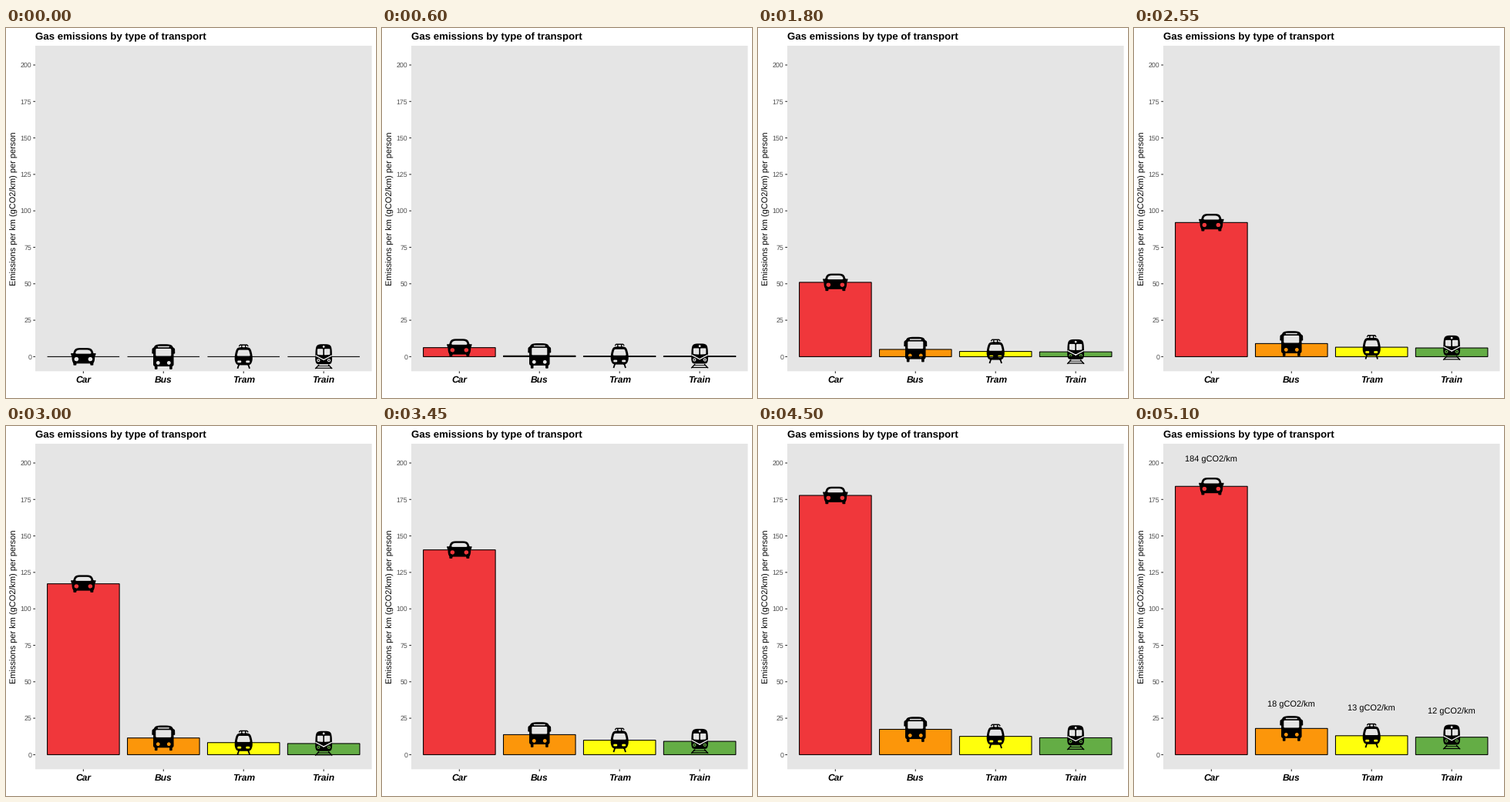
A matplotlib script that plays this animation: 480 by 480 pixels, repeating every 8000 ms.

```python
import numpy as np
import matplotlib.pyplot as plt
from matplotlib.animation import FuncAnimation
from matplotlib.patches import PathPatch, Rectangle
from matplotlib.path import Path
from matplotlib.transforms import Affine2D

plt.rcParams["font.family"] = "Liberation Sans"
plt.rcParams["text.hinting"] = "none"

SIZE = 480
TICK_MS, LOOP_MS = 50, 8000
STEP_MS, STEPS = 150, 34
LEFT, RIGHT, TOP, BOTTOM = 38, 474.5, 23, 445.3
ZERO, UNIT = 426.4, 1.892        # pixel row of 0, pixels per gram
PITCH = (RIGHT - LEFT) / 4.2
LINE = 1.07


# --- shapes: point arrays in pixels, y pointing down ---

def poly(points, r=0.0):
    """Polygon whose corners are rounded by about r pixels."""
    pts = np.array(points, float)
    if r == 0:
        return pts
    out = []
    t = np.linspace(0, 1, 7)[:, None]
    for i, p in enumerate(pts):
        ends = []
        for q in (pts[i - 1], pts[(i + 1) % len(pts)]):
            d = np.hypot(*(q - p))
            ends.append(p + (q - p) * min(r, d / 2) / d)
        a, b = ends
        out.append((1 - t) ** 2 * a + 2 * t * (1 - t) * p + t ** 2 * b)
    return np.vstack(out)


def box(x0, y0, x1, y1, r=0.0):
    return poly([(x0, y0), (x1, y0), (x1, y1), (x0, y1)], r)


def disc(x, y, r):
    a = np.linspace(0, 2 * np.pi, 25)[:-1]
    return np.column_stack([x + r * np.cos(a), y + r * np.sin(a)])


def bar(x0, y0, x1, y1, w):
    """Straight stroke of width w."""
    a, b = np.array([x0, y0]), np.array([x1, y1])
    d = (b - a) / np.hypot(*(b - a))
    n = np.array([-d[1], d[0]]) * w / 2
    return np.array([a + n, b + n, b - n, a - n])


def pair(shape):
    return [shape, shape * [-1, 1]]


def sym(half, r):
    """Closed outline from its right half, listed top to bottom."""
    return poly(half + [(-x, y) for x, y in half[::-1]], r)


def compound(solids, holes=()):
    """One path; holes wind against the solids."""
    verts, codes = [], []
    for group, sign in ((solids, 1), (holes, -1)):
        for s in group:
            x, y = s.T
            area = np.sum(x * np.roll(y, -1) - y * np.roll(x, -1))
            s = s if area * sign > 0 else s[::-1]
            verts.append(np.vstack([s, s[:1]]))
            codes += [Path.MOVETO] + [Path.LINETO] * (len(s) - 1) + [Path.CLOSEPOLY]
    return Path(np.vstack(verts), codes)


def car():
    body = sym([(8, -11.3), (11.6, -9.2), (13.2, -4.2), (15, -0.8),
                (14.6, 5.5), (12.8, 8.9)], 4)
    window = sym([(6.5, -8.9), (9.4, -7.4), (10.6, -3.8)], 2.2)
    ear = poly([(-16.4, -4.6), (-11.8, -4.2), (-12.5, -0.4), (-15.4, -0.6)], 1)
    wheel = box(-13, 6, -9, 11.2, 1)
    return compound([body, *pair(ear), *pair(wheel)],
                    [window, *pair(disc(-9, 3.2, 2.8))])


def bus():
    body = sym([(6, -16.2), (11.6, -14.8), (13.2, -9), (13.3, 12.6)], 3)
    sign = box(-7.5, -13.6, 7.5, -12.1, 0.7)
    window = box(-10, -10.4, 10, -0.8, 1.4)
    ear = poly([(-12, -12.4), (-14.8, -10.5), (-15, -3.8), (-12.8, -3.8)], 1.1)
    wheel = box(-11.4, 11, -7.8, 16.4, 1)
    return compound([body, *pair(ear), *pair(wheel)],
                    [sign, window, *pair(disc(-7, 8, 2.4))])


def tram():
    body = sym([(7.8, -12.2), (10.4, -7), (11.8, 1.5), (11, 7), (8.4, 11)], 4)
    window = sym([(6.8, -8.8), (8.8, -0.8)], 1.8)
    lamp = box(-8, 5, -3, 7.8, 1.3)
    rig = [box(-4.8, -16, 4.8, -14.5, 0.6),
           *pair(bar(-4.4, -15.4, -6, -13.4, 1.3)),
           *pair(bar(-2.4, -15, -2.4, -11.5, 1.3))]
    return compound([body, *rig, *pair(bar(-6, 10, -7.8, 15.4, 1.8))],
                    [window, *pair(lamp)])


def train():
    body = sym([(5.5, -16.2), (9.4, -14.4), (10.6, -9), (11, 5), (9.4, 9.8)], 3)
    window = poly([(-8.2, -10.2), (-0.8, -10.2), (-0.8, -2), (-8.2, -2.6)], 1.2)
    rails = [*pair(bar(-6, 10.4, -11, 15.6, 1.3)),
             bar(-8, 12, 8, 12, 0.9), bar(-10, 14.8, 10, 14.8, 1.2)]
    return compound([body, *rails, *pair(disc(-6.8, 4.8, 0.9))],
                    [*pair(window), disc(0, -13, 1.4), *pair(disc(-6.8, 4.8, 2.1))])


def chevron():
    return compound(pair(bar(-10.6, -1.6, 0.3, 4.2, 1.2)))


# --- stage ---

fig = plt.figure(figsize=(SIZE / 72, SIZE / 72), dpi=72, facecolor="white")
ax = fig.add_axes([0, 0, 1, 1])
ax.set(xlim=(0, SIZE), ylim=(SIZE, 0))
ax.axis("off")
ax.add_patch(Rectangle((LEFT, TOP), RIGHT - LEFT, BOTTOM - TOP,
                       fc="#E5E5E5", lw=0, snap=False))


def tick(xs, ys):
    ax.plot(xs, ys, color="#333333", lw=LINE, solid_capstyle="butt", snap=False)


ax.text(LEFT, 15, "Gas emissions by type of transport", size=13.2, weight="bold")
ax.text(13.4, (TOP + BOTTOM) / 2, "Emissions per km (gCO2/km) per person", size=11,
        rotation=90, rotation_mode="anchor", ha="center")
for v in range(0, 201, 25):
    y = ZERO - UNIT * v
    tick([LEFT - 2.75, LEFT], [y, y])
    ax.text(LEFT - 4.95, y + 3.2, str(v), size=8.8, color="#4D4D4D", ha="right")


class Column:
    def __init__(self, slot, name, value, color, label_y, icons):
        self.x = LEFT + PITCH * (0.6 + slot)
        self.value = value
        self.rect = Rectangle((self.x - 0.45 * PITCH, ZERO), 0.9 * PITCH, 0,
                              fc=color, ec="black", lw=LINE, zorder=2, snap=False)
        ax.add_patch(self.rect)
        self.icons = [PathPatch(path, fc=c, lw=0, zorder=4, snap=False)
                      for path, c in icons]
        for icon in self.icons:
            ax.add_patch(icon)
        self.label = ax.text(self.x, label_y, f"{value} gCO2/km", size=11,
                             ha="center", zorder=5)
        tick([self.x, self.x], [BOTTOM, BOTTOM + 2.75])
        ax.text(self.x, 460, name, size=12, weight="bold", style="italic", ha="center")

    def show(self, part, done):
        h = UNIT * self.value * part
        self.rect.set_y(ZERO - h)
        self.rect.set_height(h)
        place = Affine2D().translate(self.x, ZERO - h) + ax.transData
        for icon in self.icons:
            icon.set_transform(place)
        self.label.set_visible(done)


columns = [
    Column(0, "Car", 184, "#F0373B", 47, [(car(), "black")]),
    Column(1, "Bus", 18, "#FC960A", 365, [(bus(), "black")]),
    Column(2, "Tram", 13, "#FFFF0C", 370, [(tram(), "black")]),
    Column(3, "Train", 12, "#64AD45", 374, [(train(), "black"), (chevron(), "white")]),
]


def draw(i):
    step = min(i * TICK_MS // STEP_MS, STEPS)
    part = (1 - np.cos(np.pi * step / STEPS)) / 2   # sine ease in and out
    for col in columns:
        col.show(part, step == STEPS)
    return []


anim = FuncAnimation(fig, draw, frames=LOOP_MS // TICK_MS, interval=TICK_MS,
                     repeat=True, repeat_delay=0, blit=False)
plt.show()
```
